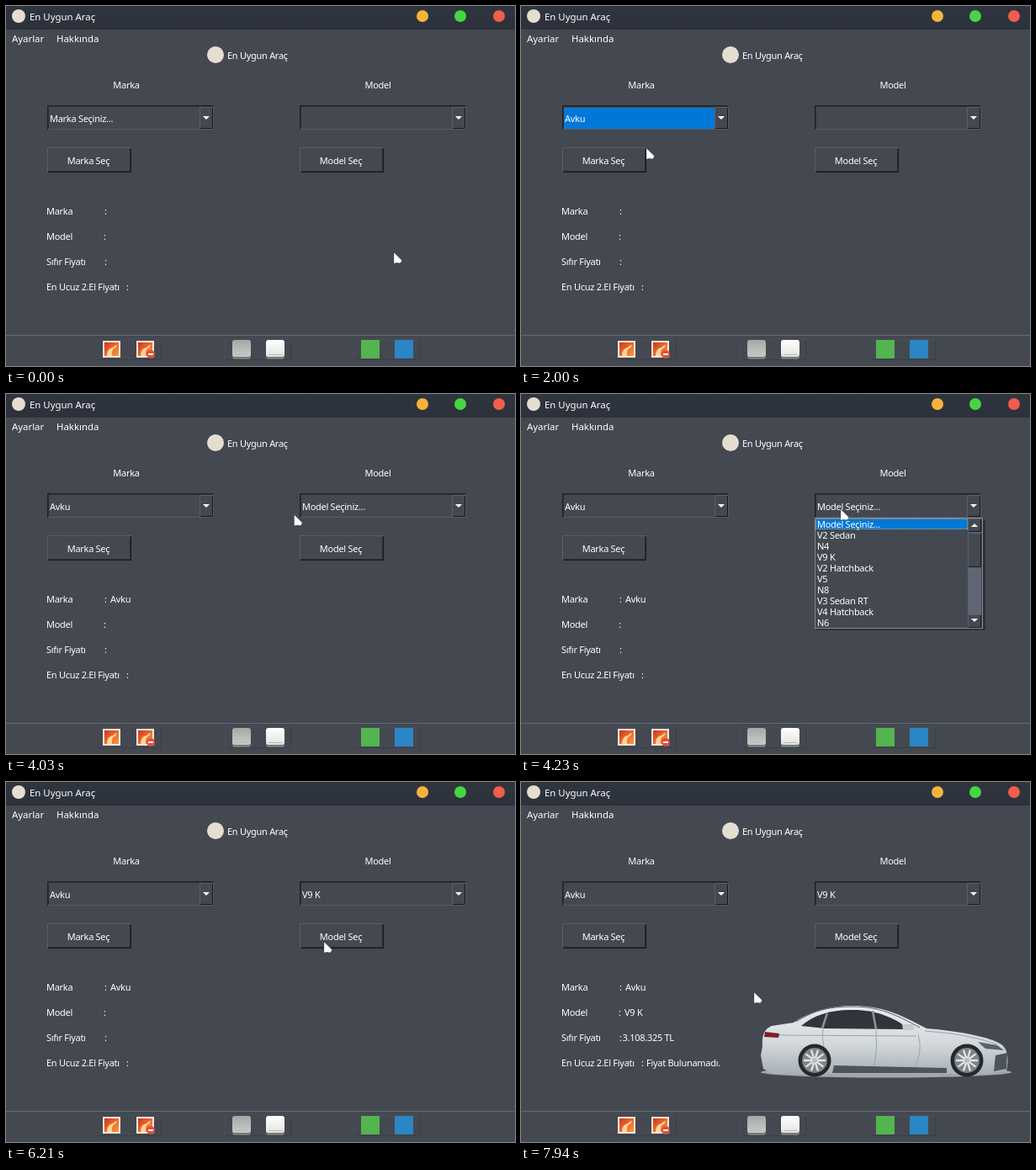
Write an HTML page that moves like this. It is 605 px wide and 428 px high and loops after 8 s.

```html
<!DOCTYPE html>
<html lang="tr">
<head>
<meta charset="utf-8">
<title>En Uygun Araç</title>
<style>
html, body { margin: 0; width: 100%; height: 100%; overflow: hidden; background: #444850; }
svg { display: block; width: 605px; height: 428px; }
text { font: 11px "Noto Sans", "Open Sans", sans-serif; letter-spacing: -.28px; fill: #fff; white-space: pre; }
.ui { font-size: 11.4px; letter-spacing: 0; }
.mid { text-anchor: middle; }
.crisp { shape-rendering: crispEdges; }
</style>
</head>
<body>
<svg id="stage" viewBox="0 0 605 428" xmlns="http://www.w3.org/2000/svg">
  <defs>
    <linearGradient id="bar" x2="0" y2="1"><stop stop-color="#2f353f"/><stop offset="1" stop-color="#2c313b"/></linearGradient>
    <linearGradient id="sunset" x2="1" y2="1"><stop stop-color="#c9341f"/><stop offset=".5" stop-color="#ee6a2c"/><stop offset="1" stop-color="#f79a3c"/></linearGradient>
    <linearGradient id="grey" x2="0" y2="1"><stop stop-color="#a4a8a4"/><stop offset="1" stop-color="#c9ccc9"/></linearGradient>
    <linearGradient id="white" x2="0" y2="1"><stop stop-color="#fff"/><stop offset="1" stop-color="#e4e4e0"/></linearGradient>
    <linearGradient id="paint" x2="0" y2="1"><stop stop-color="#e8ecee"/><stop offset=".55" stop-color="#d3d9dc"/><stop offset="1" stop-color="#a9b0b5"/></linearGradient>
    <pattern id="mesh" width="2" height="2" patternUnits="userSpaceOnUse">
      <path fill="#444850" d="M0 0h2v2H0z"/><path fill="#7b8297" d="M0 0h1v1H0zM1 1h1v1H1z"/>
    </pattern>
  </defs>
  <g id="base"></g>
  <g id="live"></g>
  <g id="car">
    <ellipse cx="434" cy="345" rx="149" ry="6.5" fill="#a3a6a8"/>
    <path fill="url(#paint)" d="M287 314C286 300 290 293 298 290L324 286C345 272 368 266 394 266C428 266 448 275 482 293C520 296 558 303 571 312C579 318 580 330 577 343L556 347H300L288 341L285 325Z"/>
    <path fill="#30353b" d="M333 290C348 277 368 271 391 271C421 270 440 279 460 292L455 294L362 293Z"/>
    <path stroke="#8b9298" stroke-width="2.5" fill="none" d="M364 275L358 293M418 272L422 294"/>
    <path stroke="#596067" fill="none" d="M327 285C350 270 370 267 395 267C425 267 445 276 474 292"/>
    <path stroke="#9ca4a9" fill="none" d="M304 301L470 302M359 294Q356 316 369 334M422 295Q424 318 420 339M472 300Q478 320 468 339M480 296Q530 299 566 312"/>
    <path fill="#4d545a" d="M372 337L506 340V346H370ZM564 325L578 322L577 341L562 344Z"/>
    <path fill="#7d2024" d="M290 297L307 299L306 304L289 303Z"/>
    <path fill="#59636a" d="M543 309L566 313L574 319L552 317Z"/>
    <path fill="#c3c9cd" d="M453 288h12q4 4 1 7h-12z"/>
    <g id="wheels"></g>
  </g>
  <path id="cursor" fill="#fff" stroke="#2c2f35" stroke-opacity=".45" stroke-width=".7" d="M0 0L9 8.8Q10 10 8.7 11.3L7.2 13Q3.5 11.6 0 13.2Z"/>
</svg>
<script>
const LOOP = 8000;
const $ = id => document.getElementById(id);
const rect = (x, y, w, h, fill, more = '') =>
  `<rect x="${x}" y="${y}" width="${w}" height="${h}" fill="${fill}" ${more}/>`;
const disc = (x, y, r, fill) => `<circle cx="${x}" cy="${y}" r="${r}" fill="${fill}"/>`;
const text = (x, y, s, cls = '') => `<text x="${x}" y="${y}" class="${cls}">${s}</text>`;
const line = (d, color) => `<path d="${d}" fill="none" stroke="${color}" class="crisp"/>`;
const between = (t, a, b) => t >= a && t < b;

// raised edge: light at top left, dark at bottom right
const bevel = (x, y, w, h, light = '#5a5e67', dark = '#17191d') =>
  line(`M${x + .5} ${y + h - .5}v${1 - h}h${w - 1}`, light) +
  line(`M${x + .5} ${y + h - .5}h${w - 1}v${1 - h}`, dark);

const button = (x, label) =>
  bevel(x, 168, 100, 30) + line(`M${x + 1} 196.5h97.5v-27`, '#2b2e34') + text(x + 49, 188, label, 'mid');

const arrow = (x, y, dir) => `<path fill="#fff" d="M${x - 4} ${y}h8l-4 ${4 * dir}z"/>`;

const combo = x =>
  bevel(x, 118, 198, 29, '#202329', '#565a62') +
  line(`M${x + 1.5} 146v-26.5h195`, '#2b2e34') +
  bevel(x + 181, 120, 16, 26) + arrow(x + 189, 131, 1);

const brands = ['Marka Seçiniz...', 'Avku', 'Brx', 'Calvoda', 'Dovra', 'Felk', 'Furn', 'Hekto', 'Hulvani', 'Ixalo'];
const models = ['Model Seçiniz...', 'V2 Sedan', 'N4', 'V9 K', 'V2 Hatchback', 'V5', 'N8', 'V3 Sedan RT', 'V4 Hatchback', 'N6'];

function list(x, items, thumb, tipY) {
  const row = Math.max(0, Math.floor((tipY - 148) / 13));
  const bar = x + 182;
  return rect(x + 2, 149, 201, 132, '#000', 'opacity=".3"') +
    rect(x, 147, 200, 132, '#444850') +
    rect(x + 1, 148 + row * 13, 181, 13, '#0078d7') +
    rect(x + 1.5, 148.5 + row * 13, 180, 12, 'none', 'stroke="#e0a060" stroke-dasharray="1 1" class="crisp"') +
    items.map((s, i) => text(x + 3, 159 + i * 13, s)).join('') +
    rect(bar, 148, 16, 130, 'url(#mesh)', 'class="crisp"') +
    [[148, 16], [165, thumb], [262, 16]].map(([y, h]) =>
      rect(bar, y, 16, h, '#444850') + bevel(bar, y, 16, h)).join('') +
    arrow(bar + 8, 158, -1) + arrow(bar + 8, 267, 1) +
    rect(x + .5, 147.5, 199, 131, 'none', 'stroke="#82868e" class="crisp"');
}

function picture(x) {
  return rect(x, 398, 21, 20, '#f3e6dc') + rect(x + 2, 400, 17, 16, 'url(#sunset)') +
    `<path fill="#ffd49a" d="M${x + 5} 416q0-9 7-10q3-3 5-3q-1 3-3 4q-4 2-3 9z"/>`;
}

const pad = (x, fill) =>
  rect(x, 398, 22, 22, '#777b78', 'rx="3"') + rect(x, 397, 22, 20, `url(#${fill})`, 'rx="3"') +
  line(`M${x + 3} 414.5h16`, '#b5b8b4');

$('base').innerHTML =
  rect(0, 0, 605, 428, '#444850') + rect(0, 0, 605, 28, 'url(#bar)') +
  disc(15, 12, 8, '#e6ddd1') + text(28, 17, 'En Uygun Araç', 'ui') +
  disc(495, 12, 7, '#f6b33c') + disc(540, 12, 7, '#46d643') + disc(586, 12, 7, '#f25d4c') +
  text(7, 43, 'Ayarlar', 'ui') + text(60, 43, 'Hakkında', 'ui') +
  disc(249, 58, 10, '#e6ddd1') + text(263, 63, 'En Uygun Araç') +
  text(143, 98, 'Marka', 'mid') + text(442, 98, 'Model', 'mid') +
  combo(49) + combo(349) + button(49, 'Marka Seç') + button(349, 'Model Seç') +
  [['Marka', 117], ['Model', 116], ['Sıfır Fiyatı', 117], ['En Ucuz 2.El Fiyatı', 143]]
    .map(([s, x], i) => text(48, 248 + i * 30, s) + text(x, 248 + i * 30, ':')).join('') +
  line('M0 391.5h605', '#676b73') +
  [106, 145, 260, 299, 414, 453].map(x => bevel(x, 396, 40, 25, '#484c54', '#3a3e45')).join('') +
  picture(115) + picture(155) + disc(172, 414, 5, '#e0503f') + rect(169, 413, 6, 2, '#fff') +
  pad(269, 'grey') + pad(309, 'white') +
  rect(422, 397, 22, 22, '#53b450') + rect(462, 397, 22, 22, '#2b86c5');

$('wheels').innerHTML = [349, 530].map(x => {
  let spokes = '';
  for (let i = 0; i < 10; i++) {
    const a = i * Math.PI / 5;
    spokes += `M${x} 331l${(13 * Math.cos(a)).toFixed(1)} ${(13 * Math.sin(a)).toFixed(1)}`;
  }
  return disc(x, 331, 19.5, '#25282c') + disc(x, 331, 15, '#7d8489') +
    `<path d="${spokes}" stroke="#dfe3e5" stroke-width="2.4"/>` + disc(x, 331, 3, '#b7bdc1');
}).join('');

// cursor legs: start, end, x, y at the end
const legs = [
  [10, 900, 201, 142], [940, 1540, 149, 169], [2080, 2590, 125, 182],
  [3500, 4200, 380, 137], [4230, 4890, 374, 199], [5890, 6200, 378, 190], [7620, 7940, 277, 250]
];

function tip(t) {
  let x = 461, y = 293;
  for (const [a, b, nx, ny] of legs) {
    if (t < a) break;
    const p = Math.min(1, (t - a) / (b - a));
    const e = p * p * (3 - 2 * p);
    x += (nx - x) * e;
    y += (ny - y) * e;
  }
  return [x, y];
}

function draw(t) {
  const [x, y] = tip(t);
  const brand = t < 1940 ? brands[0] : brands[1];
  const model = t < 3230 ? '' : t < 5420 ? models[0] : models[3];
  const focus = cx => rect(cx + 2, 121, 179, 25, '#0078d7');
  let s = '';
  if (between(t, 870, 940) || between(t, 2000, 2540)) s += focus(49);
  if (between(t, 4160, 4230) || between(t, 5550, 6140)) s += focus(349);
  s += text(52, 138, brand) + text(352, 138, model);
  if (t >= 3230) s += text(124, 248, brands[1]);
  if (t >= 7340) s += text(123, 278, models[3]) + text(120.5, 308, '3.108.325 TL') + text(149, 338, 'Fiyat Bulunamadı.');
  if (between(t, 940, 1940)) s += list(49, brands, 25, y);
  if (between(t, 4230, 5420)) s += list(349, models, 41, y);
  $('live').innerHTML = s;
  $('car').style.display = t >= 7340 ? '' : 'none';
  $('cursor').setAttribute('transform', `translate(${x.toFixed(2)} ${y.toFixed(2)})`);
}

function tick() {
  draw(performance.now() % LOOP);
  requestAnimationFrame(tick);
}
tick();
</script>
</body>
</html>
```
